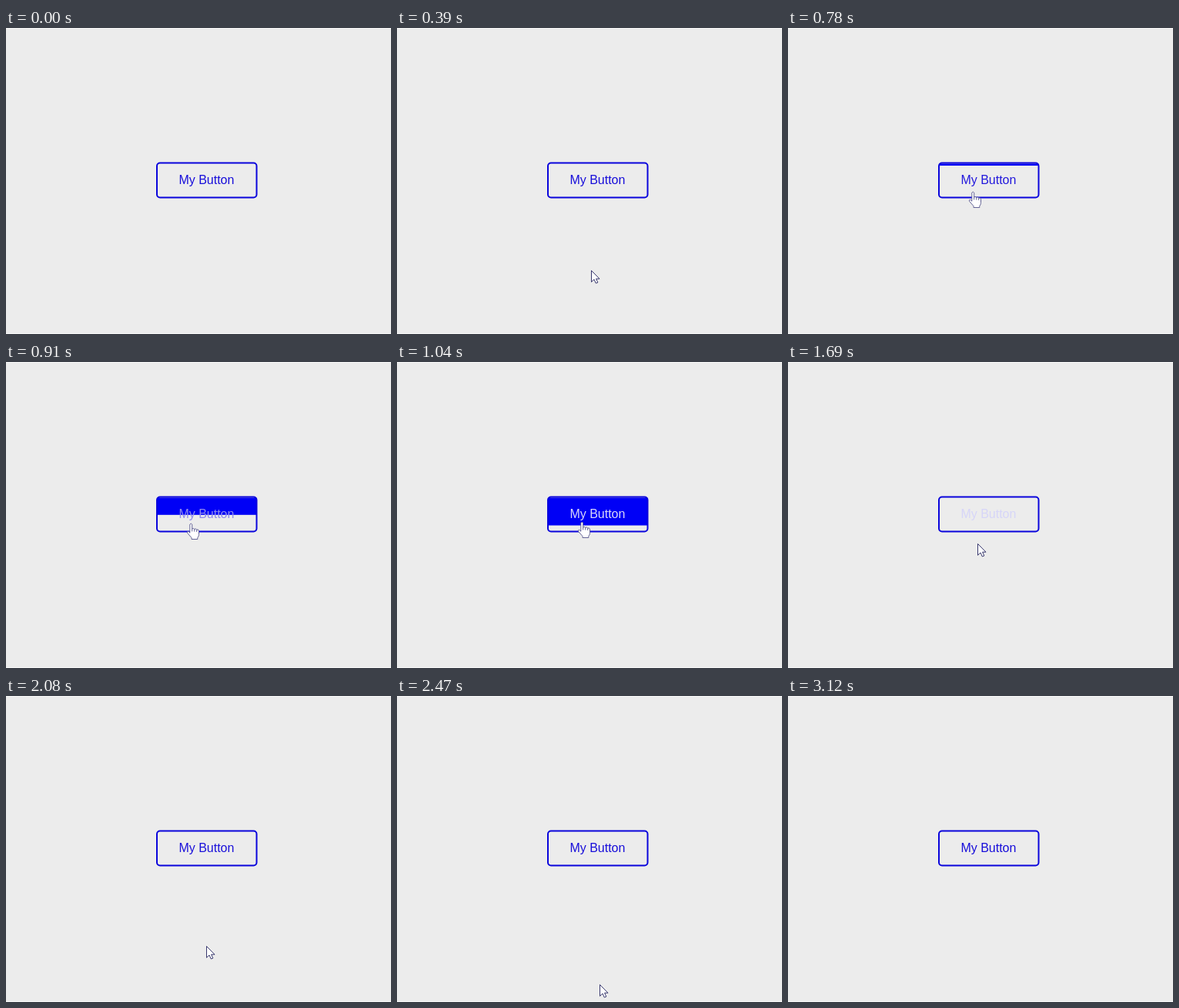
An HTML page that plays this animation: 500x398 px, repeating every 3770 ms.

```html
<!DOCTYPE html>
<html lang="en">
<head>
<meta charset="utf-8">
<title>Button hover</title>
<style>
  html, body { margin: 0; width: 100%; height: 100%; overflow: hidden; background: #ececec; }
  svg { display: block; width: 500px; height: 398px; }
  text { font: 16px "Liberation Sans", Arial, sans-serif; text-anchor: middle; }
</style>
</head>
<body>
<svg viewBox="0 0 500 398">
  <rect width="500" height="398" fill="#ececec"/>
  <path d="M0 .5H500M0 397.5H500" stroke="#f7f7f7"/>
  <rect id="fill" x="196" y="176.5" width="129.5" fill="#0000f6"/>
  <rect x="196" y="175.5" width="129.5" height="45" rx="4" fill="none" stroke="#0a04dc" stroke-width="2"/>
  <text id="label" x="260.4" y="203">My Button</text>
  <g id="cursor" fill="#fff" stroke-width=".9" stroke-linejoin="round">
    <path id="arrow" stroke="#23235f" d="M.5 .5V15.3L4 12L6.3 17L8.8 16L6.6 11.2H11Z"/>
    <g id="hand" stroke="#55558c">
      <path d="M-1.2 1.2Q.3-.8 1.7 1.2V7Q3.4 5.7 4.7 7.4Q6.5 6.3 7.7 8Q10.2 7.2 10.5 9.8V14.5
        Q10.3 17 8.8 18.5V20.5H1V18.6L-4.4 12.4Q-5.2 10.4-3.3 10.3L-1.2 12.2Z"/>
      <path d="M1.7 7V10.4M4.7 7.4V10.6M7.7 8V11" fill="none"/>
    </g>
  </g>
</svg>
<script>
const LOOP = 3770, STEP = 130, FADE = 550;
const SHOW = 260, ENTER = 745, REST = 1300, DEPART = 1575, LEAVE = 1610, HIDE = 3120;

const el = id => document.getElementById(id);
const [fill, label, cursor, arrow, hand] = ['fill', 'label', 'cursor', 'arrow', 'hand'].map(el);
const show = (node, on) => node.setAttribute('visibility', on ? 'visible' : 'hidden');
const mix = (a, b, k) => a + (b - a) * k;
const progress = (t, start, end) => Math.min(1, Math.max(0, (t - start) / (end - start)));
const easeOut = (k, power) => 1 - (1 - k) ** power;
const bezier = (a, b, s) => 3 * a * s * (1 - s) ** 2 + 3 * b * s * s * (1 - s) + s ** 3;

// the CSS "ease" curve
function ease(x) {
  let lo = 0, hi = 1;
  for (let i = 0; i < 20; i++) {
    const mid = (lo + hi) / 2;
    if (bezier(.25, .25, mid) < x) lo = mid; else hi = mid;
  }
  return bezier(.1, 1, hi);
}

// glide in from below, drift up over the button, glide out again
function pointerAt(t) {
  const arrive = easeOut(progress(t, SHOW, 780), 2);
  const drift = progress(t, 780, REST);
  const depart = progress(t, DEPART, HIDE);
  const x = mix(262, 240, arrive) - drift;
  const y = mix(395, 213, arrive) - 11 * drift;
  return [mix(x, 264, easeOut(depart, 4.5)), mix(y, 398, easeOut(depart, 2.5))];
}

function draw(t) {
  const hover = t >= ENTER && t < LEAVE;
  const enter = ease(progress(t, ENTER, ENTER + FADE));
  const white = enter - ease(progress(t, LEAVE, LEAVE + FADE));

  // the fill grows smoothly but vanishes at once
  fill.setAttribute('height', hover ? .5 + 42.5 * enter : 0);
  const [r, g, b] = [24, 14, 218].map(c => Math.round(mix(c, 255, white)));
  label.setAttribute('fill', `rgb(${r},${g},${b})`);

  const visible = t >= SHOW && t < HIDE;
  show(arrow, visible && !hover);
  show(hand, visible && hover);
  cursor.setAttribute('transform', `translate(${pointerAt(t).map(Math.round)})`);
}

function frame() {
  const t = performance.now() % LOOP;
  draw(Math.floor(t / STEP) * STEP);
  requestAnimationFrame(frame);
}
frame();
</script>
</body>
</html>
```
